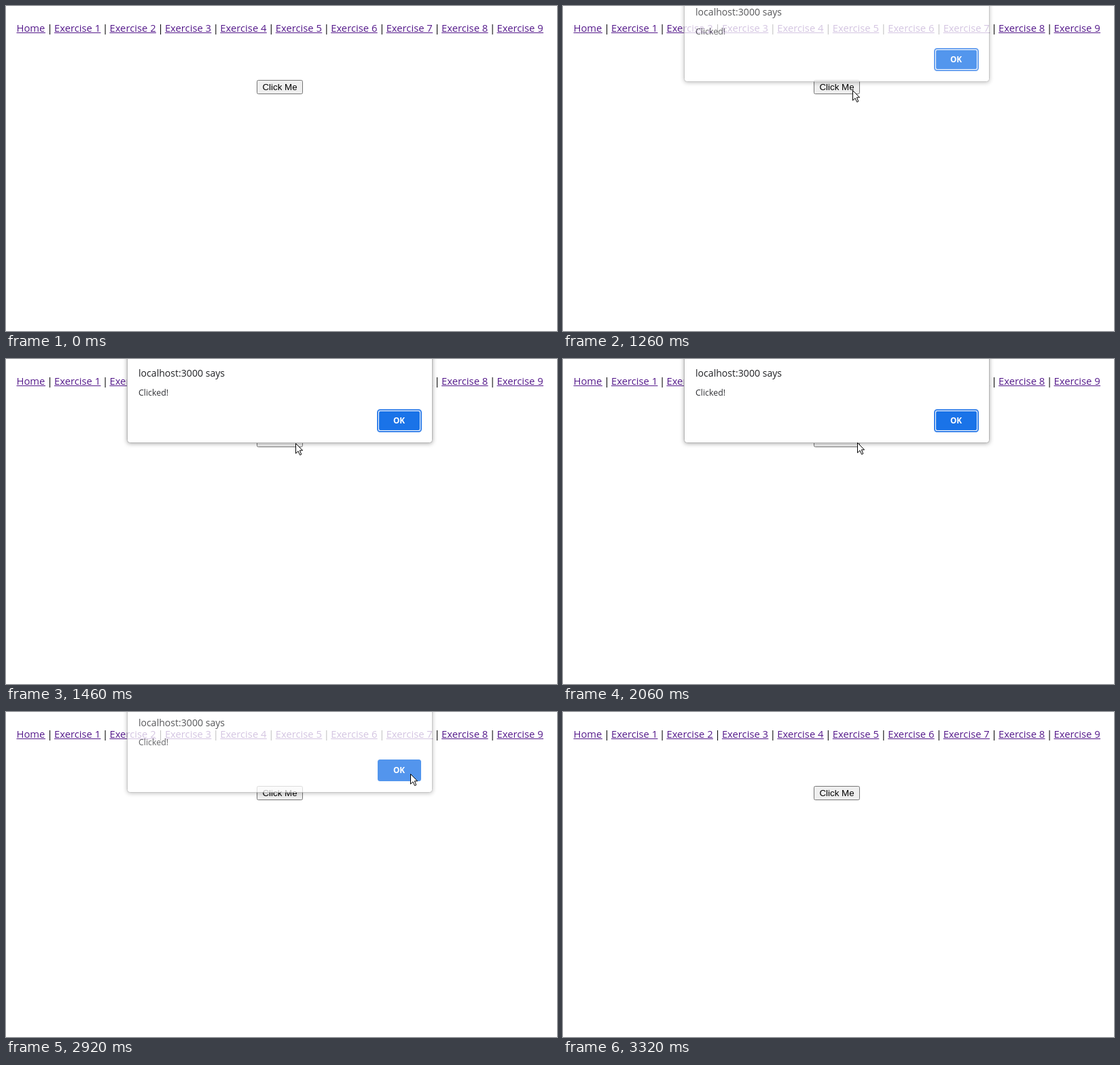
Recreate the animation shown at these times as an HTML page. Size 811 by 479 pixels, loop 3.79 s.

```html
<!DOCTYPE html>
<html lang="en">
<head>
<meta charset="utf-8">
<title>Click alert</title>
<style>
  html, body { margin: 0; width: 100%; height: 100%; overflow: hidden; background: #fff; }
  svg { display: block; width: 811px; height: 479px; }
  text { font-family: "Open Sans", "Noto Sans", sans-serif; white-space: pre; }
  .nav { font-size: 14.8px; }
  .link { fill: #551a8b; }
  .mid { text-anchor: middle; }
  .btn { font: 13.333px "Liberation Sans", Arial, sans-serif; }
  #face { fill: #efefef; stroke: #767676; }
  #face.hover { fill: #e5e5e5; stroke: #4f4f4f; }
  #ring { fill: #fff; stroke: #3a84ea; stroke-width: 2; }
  #ring.pressed { fill: #1a73e8; stroke: none; }
  #box { filter: drop-shadow(0 1px 3px rgba(0, 0, 0, .32)); }
</style>
</head>
<body>
<svg viewBox="0 0 811 479">
  <g id="nav"></g>

  <rect id="face" x="369.5" y="109.5" width="67" height="20" rx="2"/>
  <text class="btn mid" x="403" y="124">Click Me</text>

  <g id="dialog">
    <rect id="box" x="178.5" y="-40.5" width="449" height="164" rx="4" fill="#fff" stroke="#b4b4b4"/>
    <text x="195" y="26" font-size="14.1" fill="#202124">localhost:3000 says</text>
    <text x="195" y="54" font-size="12.4" fill="#303135">Clicked!</text>
    <rect id="ring" x="547" y="75" width="64" height="32" rx="3.5"/>
    <rect id="ok" x="549" y="77" width="60" height="28" rx="2" fill="#1a73e8"/>
    <text class="mid" x="578.5" y="95" font-size="11.8" font-weight="700" fill="#fff">OK</text>
  </g>

  <path id="cursor" d="M.5 1.5V16.2L4 12.8L6.6 18.5L8.8 17.6L6.4 11.8H10.6Z" fill="#fff" stroke="#000"/>
</svg>
<script>
const LOOP = 3790;
const TICK = 1000 / 15;
const $ = id => document.getElementById(id);

// Navigation row
function label(text, x, cls) {
  return `<text class="nav ${cls}" x="${x}" y="38">${text}</text>`;
}
function link(text, x, w) {
  return label(text, x, "link") +
    `<rect class="link" x="${x}" y="39" width="${w}" height="1"/>`;
}
let row = link("Home", 15.5, 42.5);
for (let n = 1; n <= 9; n++) {
  const x = 71 + 81.44 * (n - 1);
  row += label("|", x - 6.4, "mid") + link("Exercise " + n, x, 68.5);
}
$("nav").innerHTML = row;

// Progress 0..1 in whole ticks, with a little slack for rounded times
function ramp(t, start, ticks) {
  const k = Math.floor((t - start) / TICK + 0.15);
  return Math.min(1, Math.max(0, k / ticks));
}
const within = (t, a, b) => t >= a && t < b;
const smooth = p => p * p * (3 - 2 * p);
const rush = p => p ** 3.2;

const HOME = [570, 418];
const MOVES = [
  { start: 390, ticks: 5, to: [433, 131], ease: smooth },
  { start: 803, ticks: 2, to: [426, 123], ease: smooth },
  { start: 1993, ticks: 8, to: [595, 90], ease: smooth },
  { start: 2987, ticks: 4, to: [759, 465], ease: rush }
];

function cursorAt(t) {
  let [x, y] = HOME;
  for (const { start, ticks, to, ease } of MOVES) {
    const p = ease(ramp(t, start, ticks));
    x += (to[0] - x) * p;
    y += (to[1] - y) * p;
  }
  return [Math.round(x), Math.round(y)];
}

function drawDialog(t) {
  const enter = ramp(t, 1063, 6);
  const leave = ramp(t, 2850, 4);
  const lift = 24 * (1 - enter) + 18.5 * leave;
  const opacity = enter * (2 - enter) * (1 - leave);
  $("dialog").setAttribute("transform", `translate(0 ${-Math.round(lift)})`);
  $("dialog").setAttribute("opacity", opacity);

  const pressed = t >= 2790;
  $("ring").classList.toggle("pressed", pressed);
  $("ok").setAttribute("fill-opacity", 1 - 0.1 * ramp(t, 2393, 3));
}

function draw(now) {
  const t = now % LOOP;
  $("cursor").setAttribute("transform", `translate(${cursorAt(t)})`);
  $("cursor").setAttribute("opacity", within(t, 390, 3320) ? 1 : 0);
  $("face").classList.toggle("hover", within(t, 870, 1130));
  drawDialog(t);
}

const begin = performance.now();
function loop() {
  draw(performance.now() - begin);
  requestAnimationFrame(loop);
}
loop();
</script>
</body>
</html>
```
